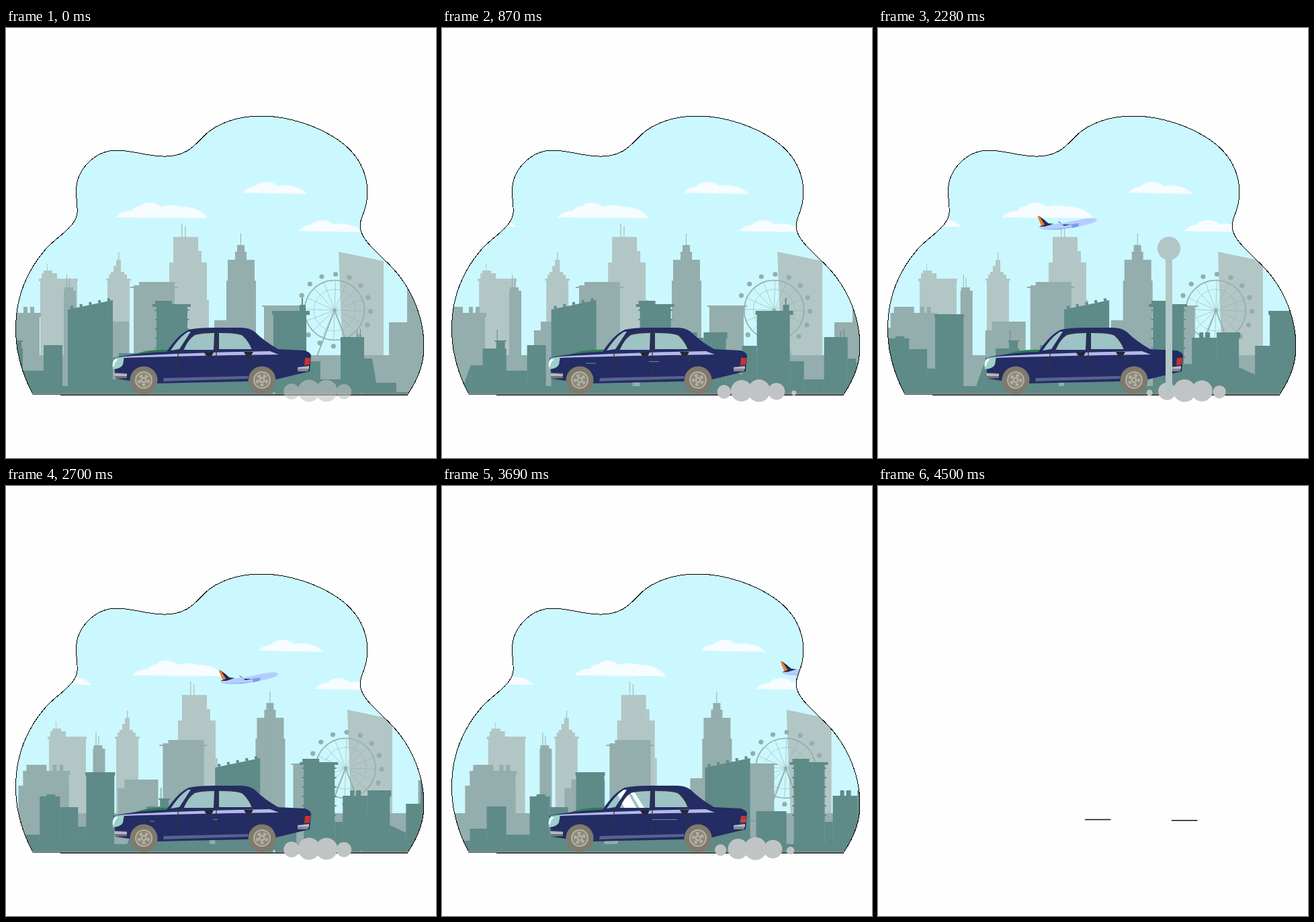
An HTML page that plays this animation: 640x640 px, repeating every 4.53 s.

```html
<!DOCTYPE html>
<html lang="en">
<head>
<meta charset="utf-8">
<title>City drive</title>
<style>
html, body { margin: 0; height: 100%; overflow: hidden; background: #fefefe }
svg { display: block; width: 100vw; height: 100vh }
.far { fill: #b2c6c6 }
.mid { fill: #94adad }
.near { fill: #5e8a87 }
.rim { fill: none; stroke: #94adad }
.seam { fill: none; stroke: #34353c; stroke-width: 1.3 }
</style>
</head>
<body>
<svg viewBox="0 0 640 640">
<defs>
  <path id="blob" d="M 40 545 C 24 515 14 480 14.5 445
    C 15 400 32 360 60 328 C 78 309 104 296 106 275
    C 107 262 103 250 105 235 C 108 210 132 182 165 182
    C 190 182 212 192 238 191 C 285 190 285 157 321 143
    C 340 134 360 131 381 131 C 420 131 465 146 495 167
    C 525 188 538 216 538 245 C 538 270 527 282 527 294
    C 527 312 545 327 562 344 C 600 378 622 425 622 475
    C 622 505 609 529 598 545 Z"/>
  <clipPath id="view"><use href="#blob"/></clipPath>
  <path id="windows" d="M 245 480 Q 258 460 271 452 H 275 L 258 478 Z
    M 264 479 Q 272 463 281 457 Q 292 454 310 454 L 309 479 Z
    M 317 478 V 454 Q 345 454 352 458 Q 361 466 366 478 Z"/>
  <clipPath id="panes"><use href="#windows"/></clipPath>
  <path id="cloud" d="M 0 16 Q 7 8 18 7 Q 26 0 36 0 Q 46 0 52 6 Q 65 4 76 7 Q 90 10 96 18 Z"/>
  <g id="wheel">
    <circle r="20.5" fill="#7f7a6c"/>
    <circle r="12" fill="#8d897a" stroke="#b4b2a3" stroke-width="2"/>
    <circle r="7" fill="none" stroke="#b4b2a3" stroke-width="4" pathLength="10" stroke-dasharray="1"/>
    <circle r="4.5" fill="#b4b2a3"/>
    <circle r="2" fill="#85816f"/>
  </g>
  <g id="jet">
    <path fill="#b4cdff" d="M 2 17 Q 8 13 38 11 L 72 4 Q 88 2 89 6 Q 88 10 66 15 Q 32 21 7 20 Z"/>
    <path fill="#8fa9e8" d="M 7 20 Q 34 20 66 15 L 50 18 Q 30 22 7 20 Z"/>
    <path fill="#202b52" d="M 2 0 Q 10 5 16 11 L 24 12 L 11 16 H 3 L 7 14 Z"/>
    <path fill="#e58135" d="M 0 0 L 4 2 L 11 13 L 6 15 Z"/>
    <path fill="#202b52" d="M 30 8 L 33 9 L 37 13 H 50 L 40 15 Z"/>
    <path fill="#799be8" d="M 50 13 L 62 11 L 61 16 L 52 18 Z"/>
  </g>
</defs>

<g id="scene">
  <g clip-path="url(#view)">
    <rect y="100" width="640" height="446" fill="#cbf8fe"/>
    <g id="clouds" fill="#f7fcff">
      <path d="M 164 282 Q 172 272 187 272 Q 193 265 200 265 Q 213 254 231 266 Q 246 262 261 266 Q 288 266 300 283 Z"/>
      <use href="#cloud" x="352" y="229"/>
      <use href="#cloud" x="435" y="286"/>
      <use href="#cloud" x="7" y="278"/>
    </g>
    <g id="far" class="far">
      <path d="M 495 333 L 562 347 V 490 H 501 Z"/>
    </g>
    <g id="ferris"></g>
    <g id="mid" class="mid"></g>
    <use id="plane" href="#jet"/>
    <g id="near" class="near">
      <path d="M -39 533 L -28 502 V 533 Z"/>
      <path d="M 92 419 L 159 405 V 546 H 92 Z"/>
      <path d="M 96 416 L 159 403" stroke="#5e8a87" stroke-width="4" stroke-dasharray="4 10"/>
      <path d="M 352 505 L 376 516 V 546 H 352 Z"/>
      <path d="M 533 492 H 545 L 551 528 V 546 H 533 Z"/>
      <path d="M 247 419 V 500" stroke="#5e8a87" stroke-width="51" stroke-dasharray="2 12"/>
    </g>
  </g>
  <use href="#blob" fill="none" stroke="#000" shape-rendering="crispEdges"/>
  <path d="M 39 544.5 H 599" stroke="#7c8c8a" stroke-width="2.5"/>
  <path d="M 81 546.5 H 598" stroke="#222"/>

  <g id="smoke" fill="#c1c4c4"></g>

  <path fill="#2d7a52" d="M 187 487 Q 212 477 245 479 L 250 486 Z"/>
  <path fill="#232c63" d="M 160 491 Q 190 484 239 482 Q 256 456 272 449
    Q 285 446 310 446 H 350 Q 362 446 370 452 Q 384 466 405 478
    L 445 480 Q 454 483 454 488 L 452 511 L 402 523 L 360 526
    L 225 529 L 184 525 L 163 522 L 162 512 Z"/>
  <use href="#windows" fill="#9dc3c4"/>
  <g clip-path="url(#panes)">
    <path id="glare" fill="#fbffff" d="M -17 452 H -1 L 16 482 H -2 Z M 3 452 H 9 L 28 482 H 21 Z"/>
  </g>
  <path class="seam" d="M 264 479 Q 272 460 281 455 Q 296 452 312 453 L 313 525
    M 264 480 L 256 491 Q 252 505 259 525
    M 315 480 V 453 Q 349 452 354 458 Q 365 470 368 484 Q 370 496 362 508"/>
  <path fill="#b4b9e8" d="M 176 489 Q 270 483 393 481 L 406 486 Q 310 487 176 491 Z"/>
  <path class="seam" d="M 313 478 V 490 M 256 482 V 492"/>
  <path fill="#26262d" d="M 295 483 H 309 L 306 488 H 298 Z M 354 482 H 368 L 365 487 H 357 Z"/>
  <path fill="#5b6291" d="M 235 521 L 360 518 V 522 L 234 526 Z"/>
  <path fill="#9ed0cb" d="M 162 491 L 176 489 L 174 501 Q 171 507 159 508 Q 157 498 162 491 Z"/>
  <path fill="#f2ffff" d="M 162 493 H 167 Q 161 498 161 504 H 159 Q 158 498 162 493 Z"/>
  <path fill="#70737c" d="M 161 513 L 180 514 V 521 L 163 522 Z"/>
  <path fill="#b7bbc1" d="M 161 514 L 180 515 V 518 H 162 Z M 434 505 L 451 503 V 507 H 434 Z"/>
  <path fill="#858993" d="M 434 507 H 451 L 449 511 H 434 Z"/>
  <path fill="#c9342b" d="M 445 491 H 453 L 452 501 L 444 502 Z"/>
  <g transform="translate(205 524)"><use class="spin" href="#wheel"/></g>
  <g transform="translate(381 524)"><use class="spin" href="#wheel"/></g>
  <path id="streaks" stroke="#7d86a0" stroke-width="1.2"/>
  <g clip-path="url(#view)">
    <g id="post" class="far">
      <circle cy="328" r="17.3"/>
      <rect x="-5" y="340" width="10" height="206"/>
    </g>
  </g>
</g>
<path id="ending" stroke="#111" stroke-width="1.6" d="M 308 496.5 H 346.5 M 437 497.8 H 475.5"/>
</svg>
<script>
const LOOP = 4530, STEP = 30;
const $ = id => document.getElementById(id);
const mod = (a, n) => ((a % n) + n) % n;
const move = (id, x, y = 0) => $(id).setAttribute('transform', `translate(${x} ${y})`);

// Each box is left, right, top and, unless it stands on the ground, bottom.
function build(id, boxes) {
  for (const [left, right, top, bottom = 546] of boxes) {
    const box = document.createElementNS('http://www.w3.org/2000/svg', 'path');
    box.setAttribute('d', `M ${left} ${top} H ${right} V ${bottom} H ${left} Z`);
    $(id).append(box);
  }
}

build('far', [
  [51, 106, 373], [49, 107, 373, 377], [53, 76, 365], [56, 69, 361], [61, 62, 351],
  [151, 184, 376], [149, 186, 373, 376], [153, 180, 367], [156, 176, 363],
  [160, 171, 354], [164, 171, 345], [167, 168.5, 334],
  [243, 299, 349], [249, 286, 311], [286, 291, 332], [299, 302, 405],
  [261, 262.5, 291], [266, 267.5, 295]
]);
build('mid', [
  [-80, 640, 487], [-25, 50, 446], [-18, 50, 424], [-18, 52, 424, 430],
  [-13, 17, 415], [26, 32, 415], [36, 42, 415],
  [86, 104, 391], [87, 100, 386], [90, 91, 367], [94, 95, 372],
  [123, 133, 450], [133, 183, 437],
  [190, 251, 383], [198, 251, 378], [185, 256, 385, 387],
  [310, 330, 435], [328, 372, 376], [330, 370, 345], [341, 358, 333],
  [344, 355, 323], [349, 350, 306],
  [384, 435, 413], [381, 440, 413, 415], [570, 640, 438], [597, 640, 387]
]);
build('near', [
  [-310, 352, 533], [-310, -258, 528], [-258, -233, 510], [-233, -204, 477],
  [-204, -169, 519], [-169, -139, 462], [-159, -146, 459], [-139, -112, 478],
  [-112, -100, 507], [-100, -58, 426], [-101, -57, 426, 431],
  [-28, 25, 502], [-10, 25, 477], [10, 23, 465], [8, 25, 465, 467],
  [11, 12, 449], [25, 56, 510], [56, 84, 472]
]);
build('near', [
  [159, 168, 523], [168, 213, 484], [224, 270, 411], [218, 275, 411, 415],
  [222, 247, 406, 411], [270, 282, 500], [282, 319, 461], [293, 299, 453],
  [302, 309, 453], [319, 352, 453], [319, 354, 453, 462],
  [376, 398, 473], [398, 447, 421], [396, 452, 421, 427],
  [437, 446, 412], [440, 442, 402], [447, 468, 496], [468, 498, 523],
  [498, 533, 460], [522, 523, 451], [527, 528, 448],
  [533, 581, 528], [581, 640, 542]
]);

function ferrisWheel() {
  let spokes = '', cabins = '';
  for (let i = 0; i < 16; i++) {
    const a = i * Math.PI / 8 + .03, c = Math.cos(a), s = Math.sin(a);
    spokes += `M 0 0 L ${44 * c} ${44 * s} `;
    cabins += `<circle cx="${53.5 * c}" cy="${53.5 * s}" r="3.6"/>`;
  }
  return `<g class="rim"><circle r="44.5" stroke-width="1.6"/><circle r="31" stroke-width=".5"/>
    <path d="${spokes}" stroke-width=".6"/><path d="M -26 68 L 0 0 L 26 68" stroke-width="1.8"/></g>
    <g class="mid">${cabins}<circle r="2.5"/></g>`;
}

// Puffs swell, then shrink, as they drift away behind the car.
function smoke(t) {
  let puffs = '';
  for (let x = 399 + mod(t / 150, 1) * 26; x < 530; x += 26) {
    const r = 17 * Math.sin(Math.PI * Math.max(0, x - 396) / 134) ** .8;
    puffs += `<circle cx="${x}" cy="${544 - r * .25}" r="${r}"/>`;
  }
  return puffs;
}

const spans = [[0, 7], [0, 0], [26, 38], [5, 42], [0, 15]];
function streaks(t) {
  const [from, to] = spans[Math.floor(t / STEP) % 5];
  if (t < 600 || from === to) return '';
  const line = (x, y) => `M ${x + from} ${y} H ${x + to} `;
  return line(308, 496.5) + (from ? line(438, 498) : line(214, 499));
}

function draw(now) {
  const t = Math.floor(mod(now, LOOP) / STEP) * STEP, s = t / 1000;
  const ended = t >= LOOP - STEP;
  $('scene').style.display = ended ? 'none' : '';
  $('ending').style.display = ended ? '' : 'none';
  move('clouds', 8.95 * s);
  move('far', 4.8 * s);
  move('ferris', 489 + 6.1 * s, 420);
  move('mid', 16.1 * s);
  move('near', 81.2 * s);
  move('plane', 118 + 189 * (s - 1.65), 288 - 13.3 * (s - 1.65));
  move('post', 433 + 800 * (s - 2.28));
  const sweep = mod(t - 1200, 2190);
  move('glare', 155 + .4 * sweep);
  $('smoke').innerHTML = smoke(t);
  $('smoke').setAttribute('opacity', Math.min(1, .6 + s));
  $('streaks').setAttribute('d', streaks(t));
  for (const wheel of document.querySelectorAll('.spin'))
    wheel.setAttribute('transform', `rotate(${-t * 72 / 150})`);
}

$('ferris').innerHTML = ferrisWheel();
const start = performance.now();
function tick() {
  draw(performance.now() - start);
  requestAnimationFrame(tick);
}
tick();
</script>
</body>
</html>
```
